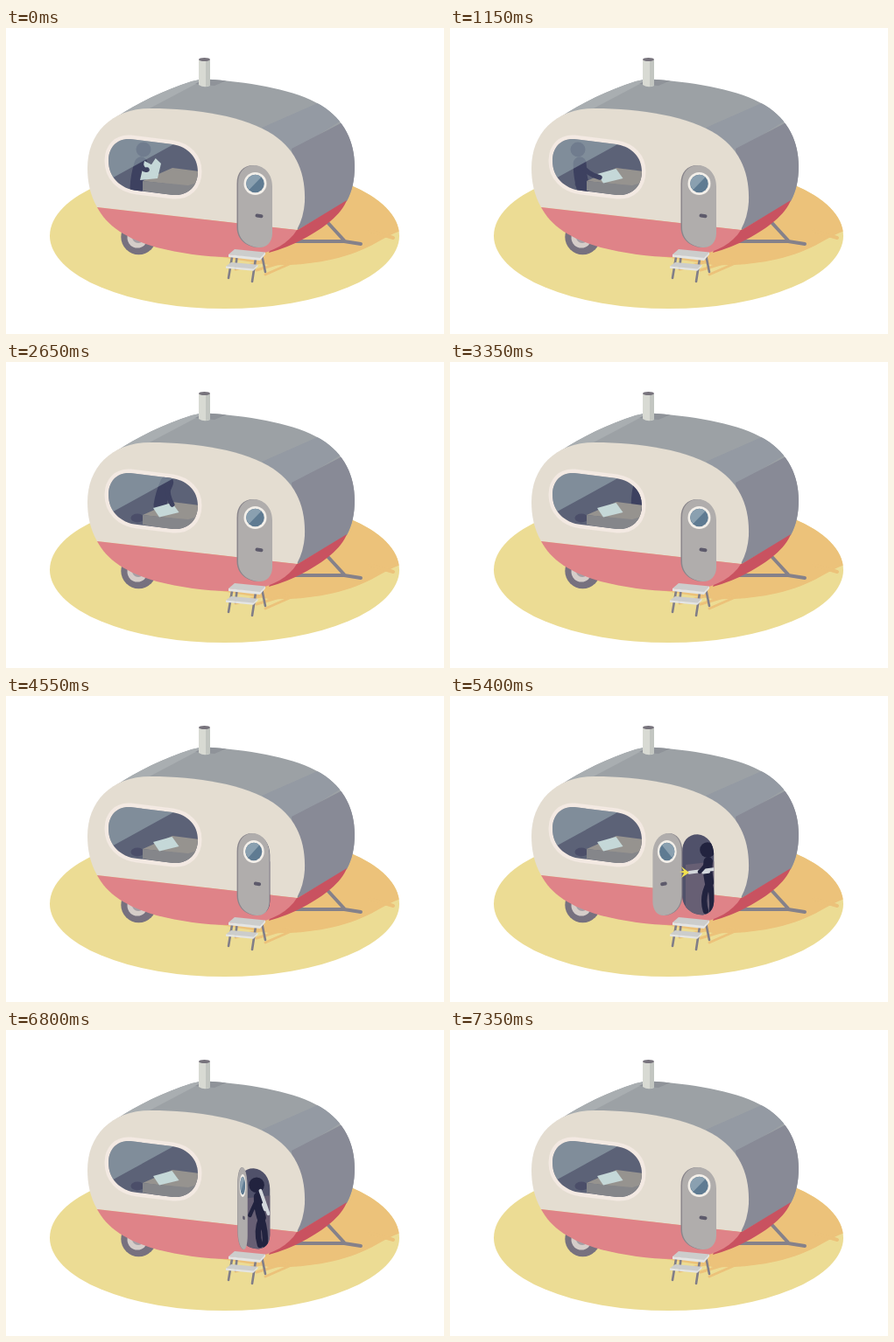
An HTML page that plays this animation: 500 px wide and 350 px high, repeating every 8 s.

```html
<!DOCTYPE html>
<html lang="en">
<head>
<meta charset="utf-8">
<title>Caravan</title>
<style>
html, body { margin: 0; width: 100%; height: 100%; overflow: hidden; background: #fff; }
svg { display: block; width: 100vw; height: 100vh; }
.line { fill: none; stroke-linecap: round; stroke-linejoin: round; }
</style>
</head>
<body>
<svg viewBox="0 0 500 350">
  <defs>
    <ellipse id="ground" cx="249.5" cy="237.5" rx="199.5" ry="83.5"/>
    <path id="pane" d="M142 127L190 133C208 136 219 148 219 164C219 181 208 192 191 191L150 186C130 184 117 170 117 152C117 136 127 126 142 127Z"/>
    <path id="roof" d="M126 102C150 86 180 71 212 61Q222 58 236 59C285 63 330 71 359 88C387 105 398 131 398 158C398 174 395 187 389 198L333 231L300 150Z"/>
    <path id="leaf" d="M0 -37C0 -50 7 -58 19 -58C31 -57 39 -47 39 -34V20C39 31 31 37 23 36C10 35 0 26 0 13Z"/>
    <use id="opening" href="#leaf" transform="translate(265 215) scale(.93 .98)"/>
    <g id="tread">
      <path fill="#cccdcc" d="M0 6L7 0L42 3.500L36 11Z"/>
      <path fill="#e4e5e4" d="M0 6L36 10L42 3.500V6L36 13L0 9Z"/>
    </g>
    <clipPath id="groundClip"><use href="#ground"/></clipPath>
    <clipPath id="paneClip"><use href="#pane"/></clipPath>
    <clipPath id="roofClip"><use href="#roof"/></clipPath>
    <clipPath id="openingClip"><use href="#leaf" transform="translate(265 215) scale(.93 .98)"/></clipPath>
    <clipPath id="guardClip">
      <use href="#leaf" transform="translate(265 215) scale(.93 .98)"/>
      <rect x="230" y="150" width="52" height="105"/>
    </clipPath>
  </defs>

  <use href="#ground" fill="#ecdc94"/>
  <g clip-path="url(#groundClip)">
    <path fill="#ecc27a" d="M160 248L300 271C350 273 394 262 422 246C432 240 442 235 450 232V150H380Z"/>
    <path class="line" stroke="#ecc27a" stroke-width="4" d="M415 232L442 240"/>
    <path class="line" stroke="#ecc27a" stroke-width="3" d="M286 277L322 266M296 282L328 268M262 276L290 268"/>
  </g>

  <circle cx="151.5" cy="239" r="20.200" fill="#77717f"/>
  <circle cx="150" cy="240" r="11.5" fill="#d5cdc9"/>
  <circle cx="151" cy="239" r="7" fill="#a69fa5"/>
  <path class="line" stroke="#85818a" stroke-width="4" d="M325 244L386 244L405 247M364 219L386 243"/>

  <use href="#roof" fill="#9ca1a5"/>
  <g clip-path="url(#roofClip)">
    <path fill="#a9aeb1" d="M120 104L205 50L228 58L160 94Z"/>
    <path fill="#8f9399" d="M216 64L230 57L252 60L238 66Z"/>
    <path fill="#949aa3" d="M292 114L360 84L400 95L327 141Z"/>
    <path fill="#888a96" d="M326 138L384 108L410 130V210L333 235Z"/>
  </g>
  <path fill="#c95260" d="M333 231L389 197C383 213 363 229 340 241Q322 251 300 257L310 230Z"/>
  <path fill="#e4ddd1" d="M104 205C96 191 93 176 93 160C93 122 119 92 165 92C218 92 273 101 305 122C333 141 342 168 341 199Q340 216 332 231Z"/>
  <path fill="#df8388" d="M104 205L332 231C323 246 305 256 283 260C250 265 208 260 172 251C137 241 115 226 104 205Z"/>

  <path fill="#d8dad3" d="M220 36V65Q226 69 233 66V36Z"/>
  <path fill="#c2c6c1" d="M228 37H233V66L228 67Z"/>
  <ellipse cx="226.5" cy="36" rx="6.5" ry="2" fill="#77737c"/>

  <use href="#pane" fill="none" stroke="#f3e9e2" stroke-width="9"/>
  <g clip-path="url(#paneClip)">
    <rect x="110" y="120" width="115" height="80" fill="#5c6277"/>
    <ellipse cx="150" cy="178.5" rx="7.5" ry="5" fill="#4b4e69"/>
    <g id="reader">
      <circle id="rHead" r="8.5" fill="#3d4160"/>
      <path id="rBody" class="line" stroke="#3d4160" stroke-width="15"/>
    </g>
    <path fill="#96938f" d="M156 175L190 160L222 164V185L208 181Z"/>
    <path fill="#85868a" d="M156 175L208 180L222 176V198L156 186Z"/>
    <path id="paper" fill="#c5d8d8"/>
    <path id="rArm" class="line" stroke="#3d4160" stroke-width="5.5"/>
    <path fill="#a8bcc0" opacity=".48" d="M110 120H215L117 174Z"/>
  </g>

  <g clip-path="url(#openingClip)">
    <rect x="260" y="150" width="50" height="110" fill="#50516a"/>
    <path fill="#675f74" d="M269 193L305 189V260H269Z"/>
  </g>
  <g id="entry">
    <g id="guard" clip-path="url(#guardClip)">
      <g class="line" stroke="#22233f">
        <path id="gLegs" stroke-width="6.5"/>
        <path id="gBody" stroke-width="10.5"/>
        <circle id="gHead" r="8.8" fill="#22233f" stroke="none"/>
        <path id="gun" stroke="#d3d7dc" stroke-width="3.8" d="M-14 0H14M2 2H8"/>
        <path id="gArm" stroke-width="4.5"/>
      </g>
      <path id="flash" fill="#f1e14e" d="M273 202L264 208L267 202.5L262 201L267 200L264 195Z"/>
    </g>
    <g id="door">
      <use href="#leaf" x="-1" fill="#8a868c"/>
      <use href="#leaf" x=".5" fill="#b0adac"/>
      <circle cx="20" cy="-37" r="13" fill="#f3efe9"/>
      <circle cx="20" cy="-37" r="10.3" fill="#5f7b92"/>
      <path fill="#8aa0b0" d="M10 -35A10.300 10.300 0 0 1 27 -44.500L13 -30Z"/>
      <path class="line" stroke="#5d5a6b" stroke-width="4" d="M22 -.5L27 .3"/>
    </g>
  </g>

  <path class="line" stroke="#817e88" stroke-width="2.6" d="M258 262L254 286M285 264L281 290M292 259L296 279M264 258L262 275"/>
  <use href="#tread" transform="translate(251 268) scale(.87 .75)"/>
  <use href="#tread" transform="translate(254 253)"/>
</svg>
<script>
const LOOP = 8000, STEP = 50, HINGE = 264.5;
const $ = id => document.getElementById(id);
const lerp = (a, b, p) => a + (b - a) * p;
const between = (a, b, p) => a.map((v, i) => lerp(v, b[i], p));
const span = (t, a, b) => Math.max(0, Math.min(1, (t - a) / (b - a)));
const easeOut = p => 1 - (1 - p) ** 2;
const smooth = p => p < .5 ? 2 * p * p : easeOut(p * 2 - 1) / 2 + .5;
const glide = (t, a, b) => smooth(span(t, a, b));

const setPath = (id, d) => $(id).setAttribute('d', d);
const place = (id, transform) => $(id).setAttribute('transform', transform);
const show = (id, on) => $(id).setAttribute('visibility', on ? 'visible' : 'hidden');

// A curve from a to b whose middle is pushed aside by (dx, dy).
function bow(a, b, dx, dy) {
  const [x, y] = between(a, b, .5);
  return `M${a}Q${x + dx} ${y + dy} ${b}`;
}

// Head, spine and one arm; the shoulder lies on the line from head to hip.
function drawFigure(prefix, head, hip, hand, sag) {
  const shoulder = between(head, hip, .36);
  place(prefix + 'Head', `translate(${head})`);
  setPath(prefix + 'Body', bow(shoulder, hip, -2, 0));
  setPath(prefix + 'Arm', bow(shoulder, hand, -2, sag));
}

function drawReader(t) {
  const lower = glide(t, 650, 1150);
  const rise = glide(t, 1600, 2450);
  const leave = span(t, 2450, 3600);
  show('reader', leave < 1);
  show('rArm', leave < 1);
  drawFigure('r',
    [157 - 11 * lower + 33 * rise + 52 * leave, 139 - 16 * rise],
    [149 + 3 * lower + 13 * rise + 63 * leave, 183 - 19 * rise],
    [161 + 10 * lower + 9 * rise + 56 * leave, 162 + 9 * lower - 8 * rise], 5);

  // The sheet unfolds as it comes down onto the table.
  const left = between([158, 152], [168, 167], lower);
  const right = between([177, 155], [189.5, 161], lower);
  const nearRight = between([173, 172], [197.5, 172], lower);
  const nearLeft = between([153, 174], [175, 177.5], lower);
  const crease = (at, bend) => {
    const [x, y] = between(left, right, at);
    return [x, y + bend * (1 - lower)];
  };
  setPath('paper', `M${[left, crease(.42, 3), crease(.67, -5), right, nearRight, nearLeft].join(' ')}Z`);
}

function drawDoor(t) {
  const open = easeOut(span(t, 4500, 5100)) * (1 - glide(t, 6250, 7350));
  const scale = Math.cos(open * 147 * Math.PI / 180);
  place('door', `translate(${HINGE} 215) scale(${scale} 1)`);
  // The swung-out leaf sits behind the figure, the closing one in front.
  const front = $(scale < 0 ? 'guard' : 'door');
  if ($('entry').lastElementChild !== front) $('entry').append(front);
  return scale;
}

function drawGuard(t, doorScale) {
  const away = 28 * (1 - glide(t, 4600, 5250));
  const reach = glide(t, 5550, 6250);
  const lean = reach * (1 - .75 * glide(t, 6250, 7050));
  const head = [294 + away - 20 * lean, 176 + 3 * lean];
  const hip = [296 + away - 11 * lean, 213 + 4 * lean];
  const foot = [292 + away - 5 * lean, 246];
  const hand = between([285 + away, 201], [257, 212], reach);
  if (reach === 1) hand[0] += 19 * (doorScale + .84);

  show('guard', t >= 4600 && t < 7350);
  drawFigure('g', head, hip, hand, 4);
  const spread = lerp(7, 4, lean);
  setPath('gLegs', bow(hip, foot, -spread, 0) +
    bow(hip, [foot[0] + spread, 246], 3, 0));
  place('gun', `translate(${lerp(287 + away, 295, reach)} ${lerp(200, 197, reach)}) rotate(${lerp(-8, 71, reach)})`);
  show('flash', t >= 5400 && t < 5500);
}

function frame() {
  const t = Math.floor(performance.now() % LOOP / STEP) * STEP;
  drawReader(t);
  drawGuard(t, drawDoor(t));
  requestAnimationFrame(frame);
}
frame();
</script>
</body>
</html>
```
